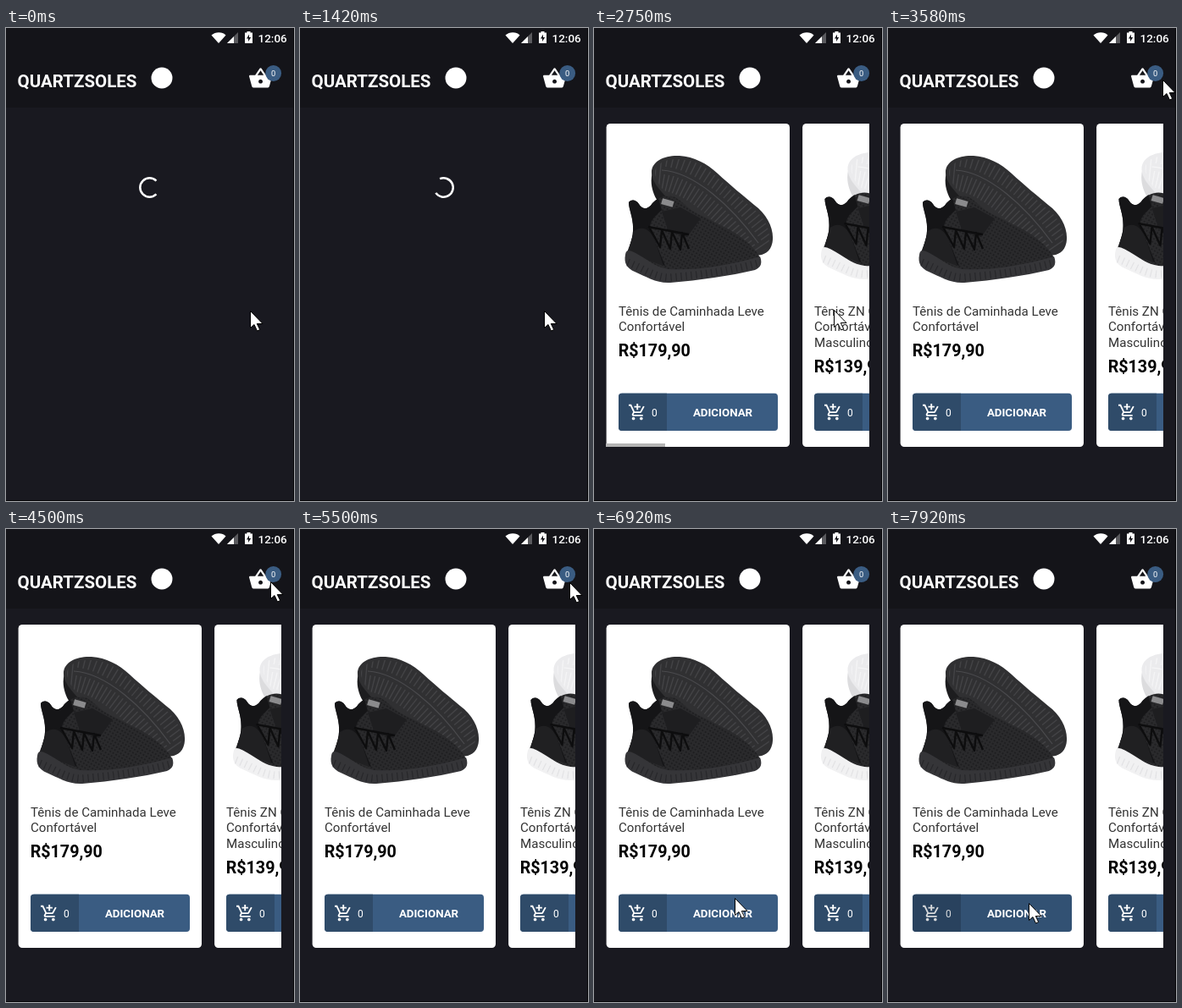
Write an HTML page that moves like this. It is 340 by 559 pixels and loops after 8000 ms.

```html
<!DOCTYPE html>
<html lang="pt-BR">
<head>
<meta charset="utf-8">
<title>Shoe store</title>
<style>
  html, body { margin: 0; width: 100%; height: 100%; overflow: hidden; background: #191920; }
  svg { display: block; width: 340px; height: 559px; font-family: Roboto, sans-serif; }
  .name { font-size: 15.11px; fill: #333; }
  .price { font-size: 19.7px; font-weight: 700; fill: #000; }
  .buy { font-size: 13.3px; font-weight: 700; }
  .count { font-size: 12px; }
  .dark { --back: #303032; --side: #1d1d1f; --tread: #4a4a4d; --sole: #353538; --ridge: #222224; }
  .light { --back: #ebebed; --side: #dcdcde; --tread: #f7f7f8; --sole: #f1f1f2; --ridge: #dcdcde; }
</style>
</head>
<body>
<svg viewBox="0 0 340 559" fill="#fff">
  <defs>
    <clipPath id="list"><rect x="14" y="100" width="311" height="400"/></clipPath>
    <clipPath id="pill"><rect x="29" y="431.7" width="188" height="44.3" rx="4"/></clipPath>
    <clipPath id="outsole"><path d="M72 172C71 160 86 154 101 155C118 156 131 163 144 175C158 188 174 202 186 212C200 222 208 236 207 250C206 264 194 267 180 262C150 252 100 215 84 194C76 185 73 178 72 172Z"/></clipPath>
    <pattern id="knit" width="4" height="4" patternUnits="userSpaceOnUse" patternTransform="rotate(30)">
      <rect width="4" height="4" fill="#2a2a2c"/><circle cx="2" cy="2" r="1" fill="#1b1b1d"/>
    </pattern>

    <g id="shoe">
      <path fill="var(--side)" d="M69 170C66 182 68 194 76 206L150 262L190 270L110 200Z"/>
      <path fill="var(--back)" d="M68 172C67 157 84 150 101 151C118 152 133 160 146 172C160 185 177 199 189 209C204 220 212 236 211 250C210 266 198 271 184 268C150 262 100 217 80 194C73 186 69 180 68 172Z"/>
      <g clip-path="url(#outsole)" fill="none" stroke="var(--tread)">
        <path d="M72 164C118 164 170 210 206 266" stroke-width="54" stroke-dasharray="1.4 4.6" opacity=".75"/>
        <path d="M80 168C118 170 162 210 194 254" stroke="var(--back)" stroke-width="9"/>
        <path d="M80 168C118 170 162 210 194 254" stroke-width="1.2"/>
      </g>
      <path fill="url(#knit)" d="M41 206C44 202 50 203 53 208C57 215 64 215 69 207C75 200 86 196 96 200C104 205 108 210 116 216C135 227 166 238 183 255C190 262 195 267 196 273L194 280C150 292 110 294 84 292L40 274C38 264 46 250 46 240C47 225 41 215 41 206Z"/>
      <path fill="#151517" d="M41 206C44 202 50 203 53 208C57 215 64 215 69 207L76 201L80 215C72 223 66 227 66 237L84 281L42 266C40 258 46 250 46 240C47 225 41 215 41 206Z"/>
      <path fill="#202022" d="M47 240C57 233 66 237 72 251L82 281L39 266C41 258 46 250 47 240Z"/>
      <path fill="#1e1e20" d="M80 217L102 212L126 225L110 247L88 241Z"/>
      <path fill="none" stroke="#0d0d0e" stroke-width="2.4" stroke-linejoin="round" d="M66 237L78 259L80 239L90 261L92 241L102 262L104 242L112 261M64 235L112 244"/>
      <rect x="80" y="203" width="14" height="7" fill="#8b8b8d" transform="rotate(16 87 206)"/>
      <path id="midsole" fill="var(--sole)" d="M37 268C38 259 45 264 56 270C66 276 74 283 88 285C125 287 160 280 196 270C199 278 197 283 190 286C160 293 125 298 90 301C74 302 62 294 48 288C39 284 35 278 37 268Z"/>
      <path fill="none" stroke="var(--ridge)" stroke-width="9" stroke-dasharray="1.2 4.8" opacity=".7" d="M40 277C58 284 70 294 88 295C125 292 160 287 194 278"/>
    </g>

    <g id="card"><rect x="14.6" y="113" width="216.4" height="382" rx="4.5"/></g>
    <g id="button">
      <g clip-path="url(#pill)">
        <rect x="29" y="431" width="188" height="45" fill="#3a5c82"/>
        <rect x="29" y="431" width="57" height="45" fill="#2f4b69"/>
      </g>
      <path transform="translate(40.1 443) scale(.925)" d="M11 9h2V6h3V4h-3V1h-2v3H8v2h3v3zm-4 9c-1.1 0-1.99.9-1.99 2S5.9 22 7 22s2-.9 2-2-.9-2-2-2zm10 0c-1.1 0-1.99.9-1.99 2s.89 2 1.99 2 2-.9 2-2-.9-2-2-2zm-9.83-3.25l.03-.12.9-1.63h7.45c.75 0 1.41-.41 1.75-1.03l3.86-7.01L19.42 4h-.01l-1.1 2-2.76 5H8.53l-.13-.27L6.16 6l-.95-2-.94-2H1v2h2l3.6 7.59-1.35 2.45c-.16.28-.25.61-.25.96 0 1.1.9 2 2 2h12v-2H7.42c-.13 0-.25-.11-.25-.25z"/>
      <text class="count" x="68" y="458.5">0</text>
    </g>
  </defs>

  <rect width="340" height="559" fill="#191920"/>
  <rect width="340" height="94" fill="#141419"/>

  <!-- status bar -->
  <path d="M242.5 8.5C247 4 255.5 4 259.5 8.5L251 18Z"/>
  <path d="M274 5V18H261Z" opacity=".3"/>
  <path d="M269 10V18H261Z"/>
  <path fill-rule="evenodd" d="M282 5.5H284.5V4H288.5V5.5H291V18H282ZM287 7.5L284 12.5H286V16L289.2 11H287Z"/>
  <text x="297.5" y="16.5" font-size="13.5" font-weight="500">12:06</text>

  <!-- header -->
  <text x="13.5" y="70" font-size="20.5" font-weight="700">QUARTZSOLES</text>
  <circle cx="184" cy="59" r="12.5"/>
  <path transform="translate(285.8 44.7) scale(1.23)" d="M17.21 9l-4.38-6.56c-.19-.28-.51-.42-.83-.42-.32 0-.64.14-.83.43L6.79 9H2c-.55 0-1 .45-1 1 0 .09.01.18.04.27l2.54 9.27c.23.84 1 1.46 1.92 1.46h13c.92 0 1.69-.62 1.93-1.46l2.54-9.27L23 10c0-.55-.45-1-1-1h-4.79zM9 9l3-4.4L15 9H9zm3 8c-1.1 0-2-.9-2-2s.9-2 2-2 2 .9 2 2-.9 2-2 2z"/>
  <circle cx="315.7" cy="53.5" r="9.4" fill="#3a5c82"/>
  <text x="315.7" y="56.8" font-size="9.4" text-anchor="middle">0</text>

  <path id="spinner" fill="none" stroke="#fff" stroke-width="2.5"/>

  <g id="products" clip-path="url(#list)">
    <use href="#card"/>
    <use href="#shoe" class="dark"/>
    <text class="name"><tspan x="29" y="340">Tênis de Caminhada Leve</tspan><tspan x="29" y="358.3">Confortável</tspan></text>
    <text class="price" x="28.7" y="388">R$179,90</text>
    <use href="#button"/>
    <rect id="press" x="29" y="431.7" width="188" height="44.3" rx="4" fill="#0c1a2c"/>
    <text class="buy" x="152" y="459" text-anchor="middle">ADICIONAR</text>
    <g transform="translate(231.5)">
      <use href="#card"/>
      <use href="#shoe" class="light" y="-4"/>
      <text class="name"><tspan x="28.5" y="340">Tênis ZN Caminhada</tspan><tspan x="28.5" y="358.3">Confortável Couro</tspan><tspan x="28.5" y="376.7">Masculino</tspan></text>
      <text class="price" x="28.2" y="406.5">R$139,90</text>
      <use href="#button" x="-.5"/>
    </g>
    <rect id="bar" x="14" y="491" width="70" height="4" fill="#b4b4b4"/>
  </g>

  <path d="M339 0H340V559H0V558H339Z" fill="#050507"/>
  <path id="cursor" stroke="#000" stroke-linejoin="round" d="M.5 .5V20.5L5 16.5L8.5 24L11.7 22.5L8.3 15.5H15Z"/>
</svg>

<script>
  const LOOP = 8000, TICK = 1000 / 12;
  const el = id => document.getElementById(id);
  const spinner = el('spinner'), products = el('products'), bar = el('bar');
  const press = el('press'), cursor = el('cursor');

  // tick, x, y
  const path = [
    [0, 288, 334], [31, 288, 334], [33, 283, 333], [37, 283, 333], [40, 305, 190],
    [43, 324, 61], [47, 321, 61], [52, 321, 61], [53, 317, 60], [54, 312, 62],
    [56, 312, 62], [59, 318, 63], [61, 322, 63], [63, 316, 63], [65, 316, 63],
    [66, 318, 63], [73, 318, 63], [75, 285, 135], [77, 214, 292], [80, 177, 402],
    [83, 166, 436], [85, 166, 442], [96, 166, 442]
  ];
  const clamp = v => Math.min(1, Math.max(0, v));

  function place(k) {
    const i = Math.max(1, path.findIndex(p => p[0] >= k));
    const [a, x, y] = path[i - 1], [b, x2, y2] = path[i];
    const f = clamp((k - a) / (b - a));
    return [x + (x2 - x) * f, y + (y2 - y) * f].map(Math.round);
  }

  // cubic bezier (.2,0) (.1,1) ending at (.5,1)
  function trim(x) {
    if (x <= 0) return 0;
    if (x >= .5) return 1;
    let lo = 0, hi = 1;
    for (let i = 0; i < 24; i++) {
      const u = (lo + hi) / 2, v = 1 - u;
      if (.6 * u * v * v + .3 * u * u * v + .5 * u ** 3 < x) lo = u; else hi = u;
    }
    return lo * lo * (3 - 2 * lo);
  }

  function arc(ms) {
    const p = (ms / 1333 + .5) % 1;
    const base = 360 * p / 4 + ms * 185 / 1420;
    const from = base + 270 * trim(p - .5);
    const to = Math.max(base + 270 * trim(p), from + 4);
    const point = deg => {
      const r = deg * Math.PI / 180;
      return (169.5 + 11.2 * Math.cos(r)).toFixed(2) + ' ' + (188.5 + 11.2 * Math.sin(r)).toFixed(2);
    };
    return `M${point(from)}A11.2 11.2 0 ${to - from > 180 ? 1 : 0} 1 ${point(to)}`;
  }

  function draw(now) {
    const k = Math.floor((now % LOOP + 4) / TICK) % 96;
    const loaded = k >= 18;
    products.style.display = loaded ? '' : 'none';
    spinner.style.display = loaded ? 'none' : '';
    if (!loaded) spinner.setAttribute('d', arc(k * TICK));
    bar.setAttribute('opacity', clamp((41 - k) / 4));
    press.setAttribute('opacity', .17 * clamp((k - 92) / 3));
    cursor.setAttribute('transform', `translate(${place(k)})`);
  }

  const start = performance.now();
  function loop() {
    draw(performance.now() - start);
    requestAnimationFrame(loop);
  }
  loop();
</script>
</body>
</html>
```
